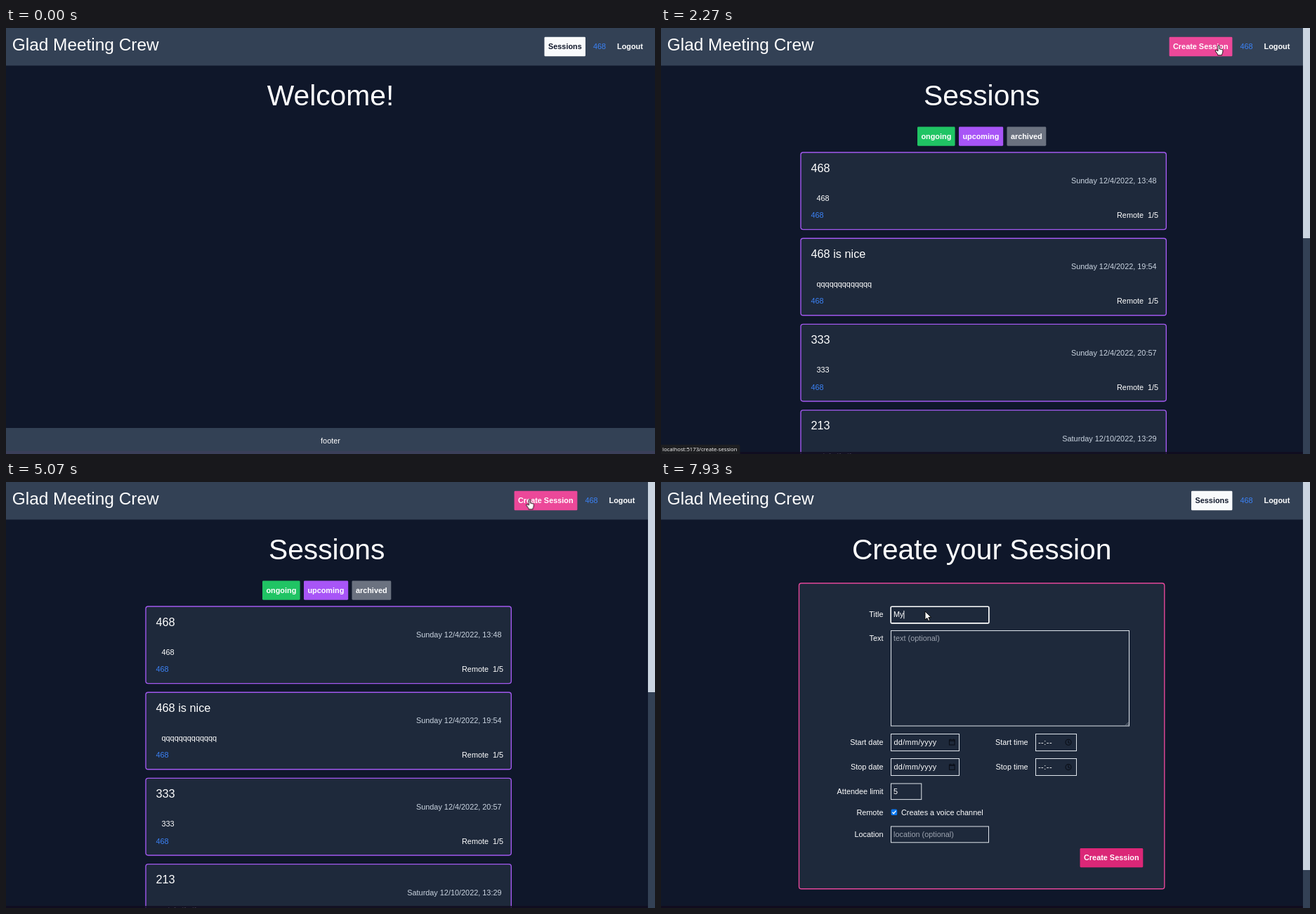
An HTML page that plays this animation: 924 by 606 pixels, repeating every 8000 ms.

```html
<!DOCTYPE html>
<html lang="en">
<head>
<meta charset="utf-8">
<title>Session planner</title>
<style>
html, body { margin: 0; width: 100%; height: 100%; overflow: hidden; background: #0f172a; }
svg { display: block; width: 924px; height: 606px; }
text { font: 10.88px "Liberation Sans", Arial, sans-serif; fill: #fff; white-space: pre; }
.b { font-weight: bold; }
.e { text-anchor: end; }
.m { text-anchor: middle; }
.brand { font-size: 24.4px; }
.h1 { font-size: 40.8px; text-anchor: middle; }
.h2 { font-size: 16.3px; }
.dark { fill: #0f172a; }
.link { fill: #3b82f6; }
.date { fill: #cbd5e1; }
.hint { fill: #9ca3af; }
.bar { fill: #334155; }
.thumb { fill: #cbd5e1; }
.panel { fill: #1e293b; stroke-width: 1.4; }
.field { fill: none; stroke: #dfe5ec; stroke-width: 1; }
.icon { fill: none; stroke: #0a0e17; stroke-width: 1.1; }
.white { fill: #f8fafc; }
.pink { fill: #db2777; }
.status rect { fill: #1d1e21; }
.status text { font: 7.72px "Open Sans", "Noto Sans", sans-serif; }
.pointer path { fill: #fff; stroke: #000; stroke-width: .9; stroke-linejoin: round; }

/* One shared clock: 1% is 80 ms */
.t { animation: 8s step-end infinite; }
.lin { animation-timing-function: linear; }
#home { animation-name: home; }
#list { animation-name: list; }
#form { animation-name: form; }
#homeBtn { animation-name: homeBtn; }
#listBtn { animation-name: listBtn; }
#formBtn { animation-name: formBtn; }
#upUrl { animation-name: upUrl; }
#newUrl { animation-name: newUrl; }
#pointer { animation-name: move; }
#arrow { animation-name: arrow; }
#hand { animation-name: hand; }
#click { animation-name: click; }
#focus { animation-name: focus; }
#hint { animation-name: hint; }
#typeM { animation-name: typeM; }
#typeY { animation-name: typeY; }
#caret { animation-name: caret; }

@keyframes home { 0% { opacity: 1 } 28.375%, 100% { opacity: 0 } }
@keyframes list { 0% { opacity: 0 } 28.375% { opacity: 1 } 73.75%, 100% { opacity: 0 } }
@keyframes form { 0% { opacity: 0 } 73.75%, 100% { opacity: 1 } }
@keyframes homeBtn { 0% { fill: #f8fafc } 18.9%, 100% { fill: #f1f5f9 } }
@keyframes listBtn { 0% { fill: #ec4899 } 34.2% { fill: #db2777 } 62.5%, 100% { fill: #ec4899 } }
@keyframes formBtn { 0% { fill: #f1f5f9 } 77.1%, 100% { fill: #f8fafc } }
@keyframes upUrl {
  0%, 21% { opacity: 0 } 23%, 28.37% { opacity: 1 }
  28.375%, 73.745% { opacity: 0 } 73.75%, 80% { opacity: 1 } 83%, 100% { opacity: 0 }
}
@keyframes newUrl {
  0%, 28.37% { opacity: 0 } 28.375%, 36% { opacity: 1 }
  38%, 69.4% { opacity: 0 } 70.4%, 73.745% { opacity: 1 } 73.75%, 100% { opacity: 0 }
}
@keyframes move {
  0%, 9.6% { transform: translate(522px, 514px) }
  11.5% { transform: translate(600px, 400px) }
  13.5% { transform: translate(740px, 220px) }
  15.3% { transform: translate(864px, 90px) }
  16.4% { transform: translate(884px, 56px) }
  17.6% { transform: translate(850px, 30px) }
  19% { transform: translate(799px, 27px) }
  24.1%, 31.3% { transform: translate(794px, 25px) }
  34% { transform: translate(758px, 39px) }
  37% { transform: translate(670px, 72px) }
  41.1% { transform: translate(604px, 85px) }
  42.9%, 53% { transform: translate(599px, 88px) }
  53.75% { transform: translate(591px, 93px) }
  56% { transform: translate(535px, 117px) }
  58% { transform: translate(509px, 122px) }
  60.5% { transform: translate(590px, 85px) }
  62% { transform: translate(690px, 45px) }
  63.4% { transform: translate(746px, 25px) }
  67.75%, 76.4% { transform: translate(751px, 24px) }
  78.8% { transform: translate(600px, 90px) }
  80.4% { transform: translate(430px, 155px) }
  81.5% { transform: translate(369px, 171px) }
  83.6% { transform: translate(373px, 180px) }
  86.75%, 100% { transform: translate(376px, 184px) }
}
@keyframes arrow {
  0% { opacity: 0 } 9.625% { opacity: 1 } 18.9% { opacity: 0 }
  34.2% { opacity: 1 } 62.5% { opacity: 0 } 77.1%, 100% { opacity: 1 }
}
@keyframes hand {
  0% { opacity: 0 } 18.9% { opacity: 1 } 34.2% { opacity: 0 }
  62.5% { opacity: 1 } 77.1%, 100% { opacity: 0 }
}
@keyframes click {
  0% { opacity: 0 } 27.5% { opacity: .75 } 28.375% { opacity: 0 }
  72.875% { opacity: .75 } 73.75% { opacity: 0 }
  84.5% { opacity: .75 } 85.4%, 100% { opacity: 0 }
}
@keyframes focus { 0% { opacity: 0 } 84.6%, 100% { opacity: 1 } }
@keyframes hint { 0% { opacity: 1 } 97.5%, 100% { opacity: 0 } }
@keyframes typeM { 0% { opacity: 0 } 97.5%, 100% { opacity: 1 } }
@keyframes typeY { 0% { opacity: 0 } 99.125%, 100% { opacity: 1 } }
@keyframes caret {
  0% { opacity: 0; transform: none }
  84.6% { opacity: 1; transform: none }
  90.875% { opacity: 0; transform: none }
  97.5% { opacity: 1; transform: translateX(9px) }
  99.125%, 100% { opacity: 1; transform: translateX(14.4px) }
}
</style>
</head>
<body>
<svg viewBox="0 0 924 606">
  <defs>
    <g id="user">
      <text class="link" x="836" y="30">468</text>
      <text class="b" x="870" y="30">Logout</text>
    </g>
    <g id="calendar" class="icon">
      <rect x="410.5" y="366.8" width="7.6" height="7.2"/>
      <path d="M410.5 368.2h7.6M412 365.5v1.5M416.6 365.5v1.5"/>
    </g>
    <g id="clock" class="icon">
      <circle cx="580" cy="370.3" r="4"/>
      <path d="M580 367.8v2.7l1.8 1.2"/>
    </g>
  </defs>
  <rect width="924" height="606" fill="#0f172a"/>
  <rect class="bar" width="924" height="53.5"/>
  <text class="brand" x="8.8" y="32">Glad Meeting Crew</text>

  <g id="home" class="t">
    <rect id="homeBtn" class="t white" x="766.5" y="12.7" width="58.5" height="27.6" rx="1.4"/>
    <text class="b dark" x="772" y="30">Sessions</text>
    <use href="#user"/>
    <text class="h1" x="462" y="109.5">Welcome!</text>
    <rect class="bar" y="569" width="924" height="37"/>
    <rect y="602" width="924" height="4" fill="#3b3f5a"/>
    <text class="m" x="462" y="591">footer</text>
  </g>

  <g id="list" class="t">
    <rect id="listBtn" class="t pink" x="723.6" y="12.7" width="89.8" height="27.6" rx="1.4"/>
    <text class="b" x="729" y="30">Create Session</text>
    <use href="#user" x="-11.5"/>
    <text class="h1" x="456.7" y="109.5">Sessions</text>
    <g id="tabs"></g>
    <g id="cards"></g>
    <rect y="603" width="914" height="3" fill="#110c1e" opacity=".8"/>
    <rect class="bar" x="914" width="10" height="606"/>
    <rect class="thumb" x="914" width="10" height="299"/>
  </g>

  <g id="form" class="t">
    <rect id="formBtn" class="t white" x="755" y="12.7" width="58.4" height="27.6" rx="1.4"/>
    <text class="b dark" x="760.5" y="30">Sessions</text>
    <use href="#user" x="-11.5"/>
    <text class="h1" x="456.7" y="109.5">Create your Session</text>
    <rect class="panel" x="196.5" y="144" width="520.3" height="434.8" rx="3.4" stroke="#e5489a"/>
    <g id="labels"></g>
    <g id="fields"></g>
    <path class="field" d="M661.5 346l4.5-4.5M664 346l2-2" stroke-opacity=".5"/>
    <text id="hint" class="t hint" x="331" y="192.3">title</text>
    <text class="hint" x="331" y="226.3">text (optional)</text>
    <text class="hint" x="331" y="505">location (optional)</text>
    <g id="when">
      <text x="331.5" y="374" letter-spacing=".3">dd/mm/yyyy</text>
      <text x="537" y="374" letter-spacing=".5">--:--</text>
      <use href="#calendar"/>
      <use href="#clock"/>
    </g>
    <use href="#when" y="35.3"/>
    <text x="331" y="443.8">5</text>
    <rect x="327.6" y="465.4" width="8.6" height="8.6" rx="1.5" fill="#0b78f0"/>
    <path d="M329.5 469.8l1.8 1.9 3.2-4.1" fill="none" stroke="#fff" stroke-width="1.3"/>
    <text x="342" y="474">Creates a voice channel</text>
    <rect class="pink" x="596.5" y="521" width="89.8" height="27.2" rx="1.4"/>
    <text class="b" x="602" y="538.3">Create Session</text>
    <g id="focus" class="t">
      <rect x="327.2" y="177.2" width="139.7" height="23.7" rx="1.5" fill="none" stroke="#fff" stroke-width="1.6"/>
    </g>
    <text id="typeM" class="t" x="331" y="192.3">M</text>
    <text id="typeY" class="t" x="340.1" y="192.3">y</text>
    <rect id="caret" class="t" x="331" y="183" width="1" height="11.5" fill="#fff"/>
    <rect y="603" width="914" height="3" fill="#110c1e"/>
    <rect class="bar" x="914" width="10" height="606"/>
    <rect class="thumb" x="914" width="10" height="552"/>
  </g>

  <g id="upUrl" class="t lin status">
    <rect x="-3" y="592.7" width="133.5" height="17" rx="2"/>
    <text x="2" y="602.4">localhost:5173/sessions/upcoming</text>
  </g>
  <g id="newUrl" class="t lin status">
    <rect x="-3" y="592.7" width="115.5" height="17" rx="2"/>
    <text x="2" y="602.4">localhost:5173/create-session</text>
  </g>

  <g id="pointer" class="t lin pointer">
    <circle id="click" class="t" cx=".5" cy=".8" r="8.8" fill="#f7e600"/>
    <path id="arrow" class="t" d="M0 0V12l2.8-2.6 1.9 4.2 2-.9-1.9-4.1h3.9z"/>
    <path id="hand" class="t" d="M-1.1 .8q0-1.2 1.1-1.2t1.1 1.2v4l3.6.8q1.4.4 1.3 1.8l-.5 3.3-.9 1.6v1.4h-6v-1.3l-3.2-4.4q-.6-1.2.6-1.5 .9-.1 2.9 1.4z"/>
  </g>
</svg>
<script>
const fill = (id, items, draw) =>
  document.getElementById(id).innerHTML = items.map(draw).join('');

fill('tabs', [
  ['ongoing', 365, 53.6, '#20c464'],
  ['upcoming', 424, 63.2, '#a855f7'],
  ['archived', 492.5, 55.8, '#6b7280']
], ([name, x, w, color]) =>
  `<rect x="${x}" y="140.5" width="${w}" height="27.2" rx="1.4" fill="${color}"/>
   <text class="b" x="${x + 5.4}" y="157.8">${name}</text>`);

fill('cards', [
  ['468', '468', 'Sunday 12/4/2022, 13:48'],
  ['468 is nice', 'q'.repeat(13), 'Sunday 12/4/2022, 19:54'],
  ['333', '333', 'Sunday 12/4/2022, 20:57'],
  ['213', 'sdsfsdfsdf', 'Saturday 12/10/2022, 13:29']
], ([title, body, date], i) =>
  `<g transform="translate(0 ${i * 122.2})">
    <rect class="panel" x="199" y="177" width="520.3" height="109.6" rx="3.4" stroke="#a259ef"/>
    <text class="h2" x="213.5" y="204.6">${title}</text>
    <text class="date e" x="705.5" y="221.3">${date}</text>
    <text x="221.5" y="246">${body}</text>
    <text class="link" x="213.5" y="270.3">468</text>
    <text x="649" y="270.3">Remote</text>
    <text class="e" x="708" y="270.3">1/5</text>
  </g>`);

fill('labels', [
  ['Title', 192.3], ['Text', 226], ['Start date', 374], ['Stop date', 409.3],
  ['Attendee limit', 443.8], ['Remote', 474], ['Location', 505],
  ['Start time', 374, 522.5], ['Stop time', 409.3, 522.5]
], ([name, y, x = 316.5]) => `<text class="e" x="${x}" y="${y}">${name}</text>`);

fill('fields', [
  [327.5, 177.5, 139, 23], [327.5, 211.5, 339, 135.5],
  [327.5, 358.5, 97, 24], [533.5, 358.5, 58, 24],
  [327.5, 393.5, 97, 24], [533.5, 393.5, 58, 24],
  [327.5, 429, 43.3, 22.6], [327.5, 490, 139, 22.8]
], ([x, y, w, h]) => `<rect class="field" x="${x}" y="${y}" width="${w}" height="${h}"/>`);
</script>
</body>
</html>
```
